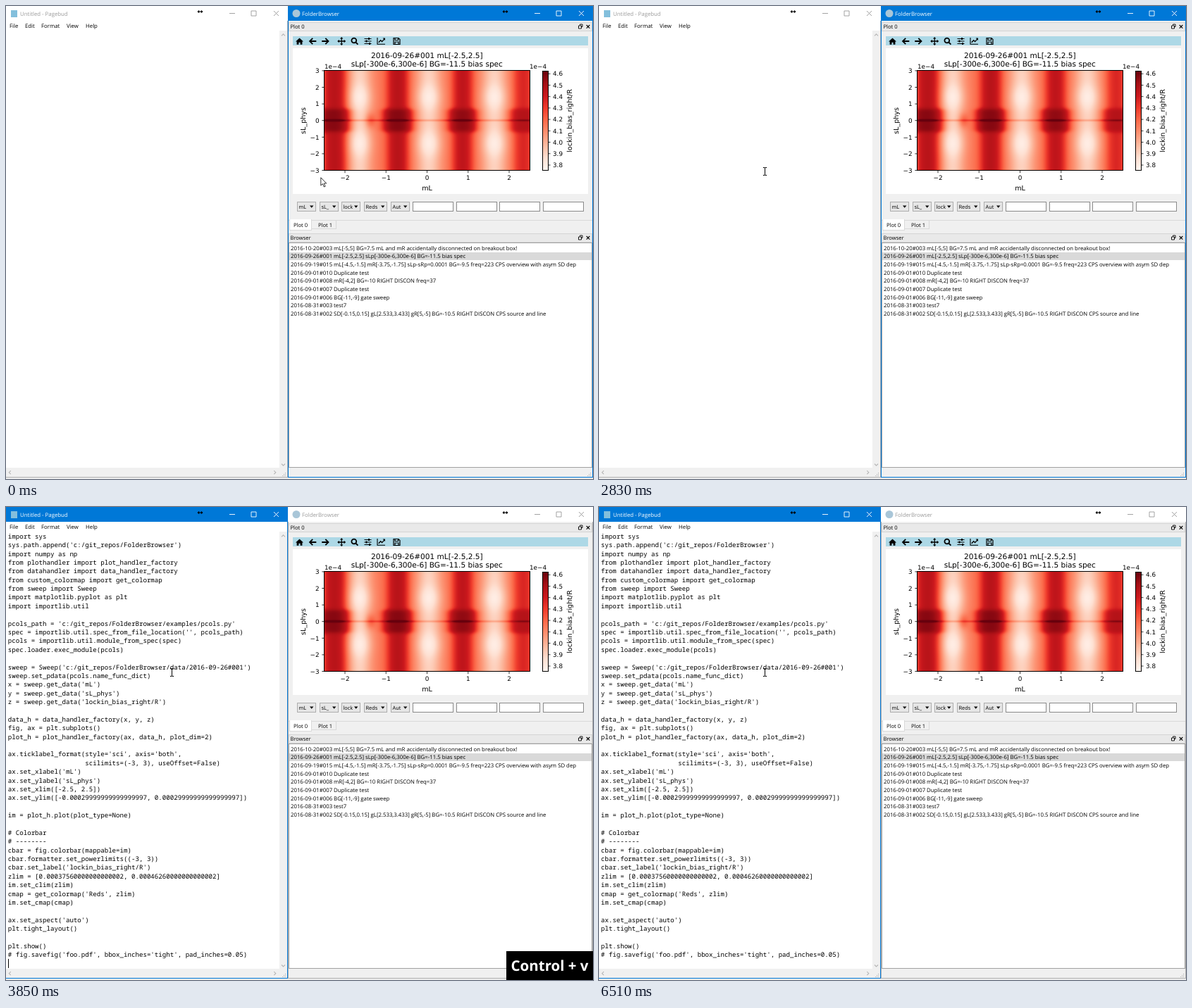
Write an HTML page with a canvas that moves like this. It is 833 px wide and 672 px high and loops after 6910 ms.

```html
<!DOCTYPE html>
<html lang="en">
<head>
<meta charset="utf-8">
<title>Copy figure code</title>
<style>
html, body { margin: 0; width: 100%; height: 100%; overflow: hidden; background: #fff; }
#stage { position: absolute; left: 0; top: 0; width: 833px; height: 672px; overflow: hidden; }
svg { position: absolute; left: 0; top: 0; }
text { text-rendering: geometricPrecision; white-space: pre; fill: #000; }
.ui { font-family: "Open Sans", "Noto Sans", sans-serif; }
.fig { font-family: "DejaVu Sans", sans-serif; }
.code { font: 9.14px "Noto Sans Mono", "DejaVu Sans Mono", monospace; }
rect, .crisp { shape-rendering: crispEdges; }
.win { --bar: #fff; --ink: #999; --edge: #b0b0b0; }
.win.on { --bar: #0078d7; --ink: #fff; --edge: #0078d7; }
.bar { fill: var(--bar); }
.edge { fill: var(--edge); }
.name { fill: var(--ink); }
.btn { fill: none; stroke: var(--ink); stroke-width: .9; }
#map { position: absolute; left: 451px; top: 91px; border: 1px solid #000; }
#keys {
  position: absolute; right: 0; bottom: 0; height: 41px; padding: 0 6.5px;
  background: #000; color: #fff; font: bold 20.5px/42px "Open Sans", "Noto Sans", sans-serif;
  white-space: pre; text-rendering: geometricPrecision;
}
</style>
</head>
<body>
<div id="stage"></div>
<script>
const NS = 'http://www.w3.org/2000/svg';
const stage = document.getElementById('stage');

function add(parent, tag, attrs, content) {
  const el = document.createElementNS(NS, tag);
  for (const k in attrs) el.setAttribute(k, attrs[k]);
  if (content !== undefined) el.textContent = content;
  parent.appendChild(el);
  return el;
}
const svg = add(stage, 'svg', { width: 833, height: 672, viewBox: '0 0 833 672' });
const group = (cls = '') => add(svg, 'g', { class: cls });
const rect = (p, x, y, width, height, fill, more = {}) =>
  add(p, 'rect', { x, y, width, height, fill, ...more });
const box = (p, x, y, w, h, fill, stroke) => rect(p, x + .5, y + .5, w - 1, h - 1, fill, { stroke });
const path = (p, d, more = {}) => add(p, 'path', { d, fill: 'none', stroke: '#000', ...more });
// y is the middle of the capitals
const label = (p, x, y, s, size = 7.8, more = {}) =>
  add(p, 'text', { class: 'ui', x, y: y + size * .36, 'font-size': size, ...more }, s);
const figText = (p, x, y, s, size, anchor = 'middle', turn = '') =>
  add(p, 'text', { class: 'fig', x, y: y + size * .365, 'font-size': size, 'text-anchor': anchor, transform: turn }, s);

rect(svg, 0, 0, 833, 672, '#ececec');

function windowFrame(x, w, title, titleX, icon) {
  const g = group('win');
  rect(g, x, 0, w, 670, '', { class: 'edge' });
  rect(g, x ? x + 1 : 0, 1, x ? w - 2 : w - 1, 668, '#f0f0f0');
  rect(g, x, 0, w, 21, '', { class: 'bar' });
  icon(g);
  label(g, titleX, 10.8, title, 7.8, { class: 'ui name' });
  const r = x + w - (x ? 17 : 17);
  path(g, `M${r - 66} 10.5h8M${r - 35} 7h7v7h-7zM${r - 3} 7l7 7m0 -7l-7 7`, { class: 'btn', stroke: '' });
  const m = x ? 708.5 : 275.5;
  path(g, `M${m - 3} 8h6`, { 'stroke-width': 1.2 });
  path(g, `M${m - 4} 8l2.6 -2.2v4.4zM${m + 4} 8l-2.6 -2.2v4.4z`, { fill: '#000', stroke: 'none' });
  return g;
}

// Editor window
const editor = windowFrame(0, 400, 'Untitled - Pagebud', 20,
  g => rect(g, 7, 6, 9, 10, '#83bfdc'));
rect(editor, 0, 21, 399, 14, '#fff');
rect(editor, 0, 35, 388, 621, '#fff');
[['File', 5], ['Edit', 27], ['Format', 50], ['View', 86], ['Help', 113]]
  .forEach(([s, x]) => label(editor, x, 28, s));
const chevron = { stroke: '#b5b5b5', 'stroke-width': 1.1 };
path(editor, 'M391 42.3l2.5 -2.5l2.5 2.5M391 650.5l2.5 2.5l2.5 -2.5M6.8 660.2l-2.5 2.5l2.5 2.5M380.3 660.2l2.5 2.5l-2.5 2.5', chevron);

function grip(p, x, y) {
  for (let r = 0; r < 3; r++)
    for (let c = 0; c <= r; c++) rect(p, x - c * 2, y - (2 - r) * 2, 1, 1, '#b0b0b0');
}
grip(editor, 396, 667);

const listing = `import sys
sys.path.append('c:/git_repos/FolderBrowser')
import numpy as np
from plothandler import plot_handler_factory
from datahandler import data_handler_factory
from custom_colormap import get_colormap
from sweep import Sweep
import matplotlib.pyplot as plt
import importlib.util

pcols_path = 'c:/git_repos/FolderBrowser/examples/pcols.py'
spec = importlib.util.spec_from_file_location('', pcols_path)
pcols = importlib.util.module_from_spec(spec)
spec.loader.exec_module(pcols)

sweep = Sweep('c:/git_repos/FolderBrowser/data/2016-09-26#001')
sweep.set_pdata(pcols.name_func_dict)
x = sweep.get_data('mL')
y = sweep.get_data('sL_phys')
z = sweep.get_data('lockin_bias_right/R')

data_h = data_handler_factory(x, y, z)
fig, ax = plt.subplots()
plot_h = plot_handler_factory(ax, data_h, plot_dim=2)

ax.ticklabel_format(style='sci', axis='both',
                    scilimits=(-3, 3), useOffset=False)
ax.set_xlabel('mL')
ax.set_ylabel('sL_phys')
ax.set_xlim([-2.5, 2.5])
ax.set_ylim([-0.00029999999999999997, 0.00029999999999999997])

im = plot_h.plot(plot_type=None)

# Colorbar
# --------
cbar = fig.colorbar(mappable=im)
cbar.formatter.set_powerlimits((-3, 3))
cbar.set_label('lockin_bias_right/R')
zlim = [0.00037560000000000002, 0.00046260000000000002]
im.set_clim(zlim)
cmap = get_colormap('Reds', zlim)
im.set_cmap(cmap)

ax.set_aspect('auto')
plt.tight_layout()

plt.show()
# fig.savefig('foo.pdf', bbox_inches='tight', pad_inches=0.05)`.split('\n');
const LINE = 12.385;
const code = group('code');
listing.forEach((s, i) => s && add(code, 'text', { x: 2.8, y: 44.8 + i * LINE }, s));
const caret = rect(svg, 3, 35, 1, 13, '#000');

// Browser window
const app = windowFrame(400, 433, 'FolderBrowser', 420,
  g => add(g, 'circle', { cx: 412, cy: 10.5, r: 5.5, fill: '#a9c6d8' }));

function dockTitle(y, s) {
  box(app, 401, y, 431, 13, '#e9e9e9', '#d4d4d4');
  label(app, 403.5, y + 6.5, s, 7.6);
  path(app, `M814.5 ${y + 4.5}v-1.5h3.5v3.5h-1.2M812.5 ${y + 5}h4v4h-4z`, { 'stroke-width': .9 });
  path(app, `M823.7 ${y + 4}l4.6 4.6m0 -4.6l-4.6 4.6`, { 'stroke-width': 1.1 });
}
dockTitle(23, 'Plot 0');
dockTitle(323, 'Browser');

// Toolbar
rect(app, 407, 43, 419, 13, '#add8e6');
const solid = { fill: '#000', stroke: 'none' };
const thick = { 'stroke-width': 1.8 };
path(app, 'M411 50.5l5.5 -5l5.5 5h-1.6v4.3h-2.8v-3h-2.2v3h-2.8v-4.3z', solid);
path(app, 'M440.3 50h-9M435.2 45.8l-4.2 4.2l4.2 4.2', thick);
path(app, 'M448.2 50h9M453.3 45.8l4.2 4.2l-4.2 4.2', thick);
path(app, 'M471.5 50h9.5M476.2 45.3v9.5', { 'stroke-width': 1.3 });
path(app, 'M470.2 50l2.6 -2.2v4.4zM482.2 50l-2.6 -2.2v4.4zM476.2 44l-2.2 2.6h4.4zM476.2 56l-2.2 -2.6h4.4z', solid);
path(app, 'M497.2 49a3.4 3.4 0 1 1 -6.8 0a3.4 3.4 0 1 1 6.8 0M496.4 51.6l3 3', thick);
path(app, 'M508.5 46.5h10M508.5 50h10M508.5 53.5h10', { 'stroke-width': 1.1 });
path(app, 'M515 45v3M511.5 48.5v3M516 52v3', { 'stroke-width': 1.9 });
path(app, 'M527 45v9.3h11', { 'stroke-width': 1.1 });
path(app, 'M528.8 51.8l2.8 -3l2 1.8l3.6 -4', { 'stroke-width': 1.4 });
path(app, 'M534.6 45.6h3.4v3.4z', solid);
path(app, 'M550 45.5h7l2 2v7h-9zM552 45.5v3h4.5v-3M552 54.5v-3.5h5v3.5', { 'stroke-width': 1.2 });

// Figure
rect(app, 407, 60, 419, 207, '#fff');
figText(app, 597.3, 69.7, '2016-09-26#001 mL[-2.5,2.5]', 10.55);
figText(app, 597.3, 82.2, 'sLp[-300e-6,300e-6] BG=-11.5 bias spec', 10.55);
figText(app, 452, 86, '1e−4', 8.8, 'start');
figText(app, 743, 86, '1e−4', 8.8, 'start');
const signed = n => (n < 0 ? '−' : '') + Math.abs(n);
const tick = { 'stroke-width': .8 };
for (let n = -2; n <= 2; n++) {
  const x = 597.5 + n * 58.25;
  path(app, `M${x} 234v3.2`, tick);
  figText(app, x, 244.2, signed(n), 8.8);
}
for (let n = -3; n <= 3; n++) {
  const y = 162.7 - n * 23.6;
  path(app, `M451.5 ${y}h-3.2`, tick);
  figText(app, 444.5, y, signed(n), 8.8, 'end');
}
figText(app, 597.5, 258, 'mL', 9.6);
figText(app, 0, 0, 'sL_phys', 9.6, 'middle', 'translate(421.8 163) rotate(-90)');
figText(app, 0, 0, 'lockin_bias_right/R', 9.6, 'middle', 'translate(799 163) rotate(-90)');

const REDS = [[255, 245, 240], [254, 224, 210], [252, 187, 161], [252, 146, 114], [251, 106, 74],
  [239, 59, 44], [203, 24, 29], [165, 15, 21], [103, 0, 13]];
const ramp = add(svg, 'linearGradient', { id: 'ramp', x1: 0, y1: 1, x2: 0, y2: 0 });
REDS.forEach((c, i) => add(ramp, 'stop', { offset: i / 8, 'stop-color': `rgb(${c})` }));
box(app, 761, 92, 9, 142, 'url(#ramp)', '#000');
for (let n = 0; n < 9; n++) {
  const y = 226 - n * 16.22;
  path(app, `M769.5 ${y}h3`, tick);
  figText(app, 776, y, (3.8 + n / 10).toFixed(1), 8.8, 'start');
}

// Heat map: dark stripes [centre, half width, height] over pale valleys [centre, width]
const STRIPES = [[467, 15, .36], [556, 14, .36], [648, 13, .34], [734, 12, .25]];
const VALLEYS = [[502, 17], [600, 18], [693, 18]];
const bell = (d, w) => Math.exp(-(d * d) / (w * w));
const step = (d, soft) => 1 / (1 + Math.exp(d / soft));

function level(x, y) {
  const d = Math.abs(y - 162.5);
  const band = step(d - 16.5, 1.6);
  const pale = .28 + .13 * bell(d - 33, 17);
  let v = .46 + .13 * bell(d, 1.6);
  for (const [c, w] of VALLEYS) v -= pale * bell(x - c, w);
  for (const [c, w, h] of STRIPES) v += (h + .12 * band) * step(Math.abs(x - c) - w - 6 * band, 3.6);
  return v + .17 * bell(x - 517, 7) * bell(d, 10);
}
function reds(v) {
  const p = Math.min(7.999, Math.max(0, v * 8)), i = Math.floor(p);
  return REDS[i].map((c, k) => c + (REDS[i + 1][k] - c) * (p - i));
}
const map = document.createElement('canvas');
map.id = 'map';
map.width = 291;
map.height = 141;
stage.appendChild(map);
const ctx = map.getContext('2d');
const img = ctx.createImageData(291, 141);
for (let i = 0; i < 291 * 141; i++)
  img.data.set([...reds(level(452.5 + i % 291, 92.5 + Math.floor(i / 291))), 255], i * 4);
ctx.putImageData(img, 0, 0);

// Controls
[['mL', 413, 27], ['sL_', 445, 27], ['lock', 476, 27], ['Reds', 508, 33], ['Aut', 546, 27]].forEach(([s, x, w]) => {
  box(app, x, 278, w, 14, '#e6e6e6', '#adadad');
  label(app, x + 2.5, 285.2, s, 7.4);
  path(app, `M${x + w - 9} 283.4h5.4l-2.7 3.4z`, solid);
});
[577, 639, 700, 762].forEach(x => box(app, x, 278, 58, 14, '#fff', '#8a8a8a'));

// Tabs
rect(app, 401, 304, 431, 1, '#d9d9d9');
box(app, 433, 304, 36, 13, '#f0f0f0', '#d9d9d9');
box(app, 402, 303, 32, 16, '#fff', '#d9d9d9');
rect(app, 403, 303, 30, 1, '#fff');
label(app, 408, 311.3, 'Plot 0', 7.6);
label(app, 443, 311, 'Plot 1', 7.6);

// Runs
box(app, 401, 336, 431, 320, '#fff', '#a0a0a0');
rect(app, 402, 350, 429, 11, '#d9d9d9');
['2016-10-20#003 mL[-5,5] BG=7.5 mL and mR accidentally disconnected on breakout box!',
  '2016-09-26#001 mL[-2.5,2.5] sLp[-300e-6,300e-6] BG=-11.5 bias spec',
  '2016-09-19#015 mL[-4.5,-1.5] mR[-3.75,-1.75] sLp-sRp=0.0001 BG=-9.5 freq=223 CPS overview with asym SD dep',
  '2016-09-01#010 Duplicate test',
  '2016-09-01#008 mR[-4,2] BG=-10 RIGHT DISCON freq=37',
  '2016-09-01#007 Duplicate test',
  '2016-09-01#006 BG[-11,-9] gate sweep',
  '2016-08-31#003 test7',
  '2016-08-31#002 SD[-0.15,0.15] gL[2.533,3.433] gR[5,-5] BG=-10.5 RIGHT DISCON CPS source and line'
].forEach((s, i) => label(app, 404, 343.7 + i * 11.7, s));
grip(app, 829, 667);
const status = label(app, 404.5, 663, 'Code for figure copied to clipboard.');

// Pointers, drawn around their hot spots
const arrow = path(svg, 'M0 0v11.2l2.6 -2.4l1.9 4.4l1.8 -.8l-1.9 -4.2h3.5z',
  { fill: '#fff', 'stroke-width': .8 });
const beam = path(svg, 'M-2.5 -5.5h2l.5 .5l.5 -.5h2M0 -5v10M-2.5 5.5h2l.5 -.5l.5 .5h2', { 'stroke-width': 1 });

const keys = document.createElement('div');
keys.id = 'keys';
stage.appendChild(keys);

// Steps: [start in ms, value]
const LOOP = 6910;
const PRESSED = [[0, ''], [810, 'F2'], [1830, ''], [3670, 'Control'], [3850, 'Control + v'], [5060, '']];
const POINTER = [[0, [446.8, 243.8]], [2230, [428.6, 244.8]], [2420, [343.5, 251]], [2630, [271.5, 245.5]], [2830, [235.5, 235]]];
const BLINK = [[0, 0], [3030, 1], [3450, 0], [3850, 1], [4470, 0], [4870, 1], [5490, 0], [5880, 1], [6510, 0]];
const at = (steps, t) => steps.filter(s => s[0] <= t).pop()[1];
const show = (el, on) => { el.style.display = on ? '' : 'none'; };

function draw(t) {
  const typing = t >= 3030, pasted = t >= 3850, overEditor = t >= 2420;
  editor.setAttribute('class', typing ? 'win on' : 'win');
  app.setAttribute('class', typing ? 'win' : 'win on');
  show(code, pasted);
  show(caret, at(BLINK, t));
  caret.setAttribute('y', pasted ? 642 : 35);
  show(status, t >= 810 && t < 1830);
  const combo = at(PRESSED, t);
  keys.textContent = combo;
  show(keys, combo);
  show(arrow, !overEditor);
  show(beam, overEditor);
  (overEditor ? beam : arrow).setAttribute('transform', `translate(${at(POINTER, t)})`);
}
const start = performance.now();
function tickFrame() {
  draw((performance.now() - start) % LOOP);
  requestAnimationFrame(tickFrame);
}
tickFrame();
</script>
</body>
</html>
```
